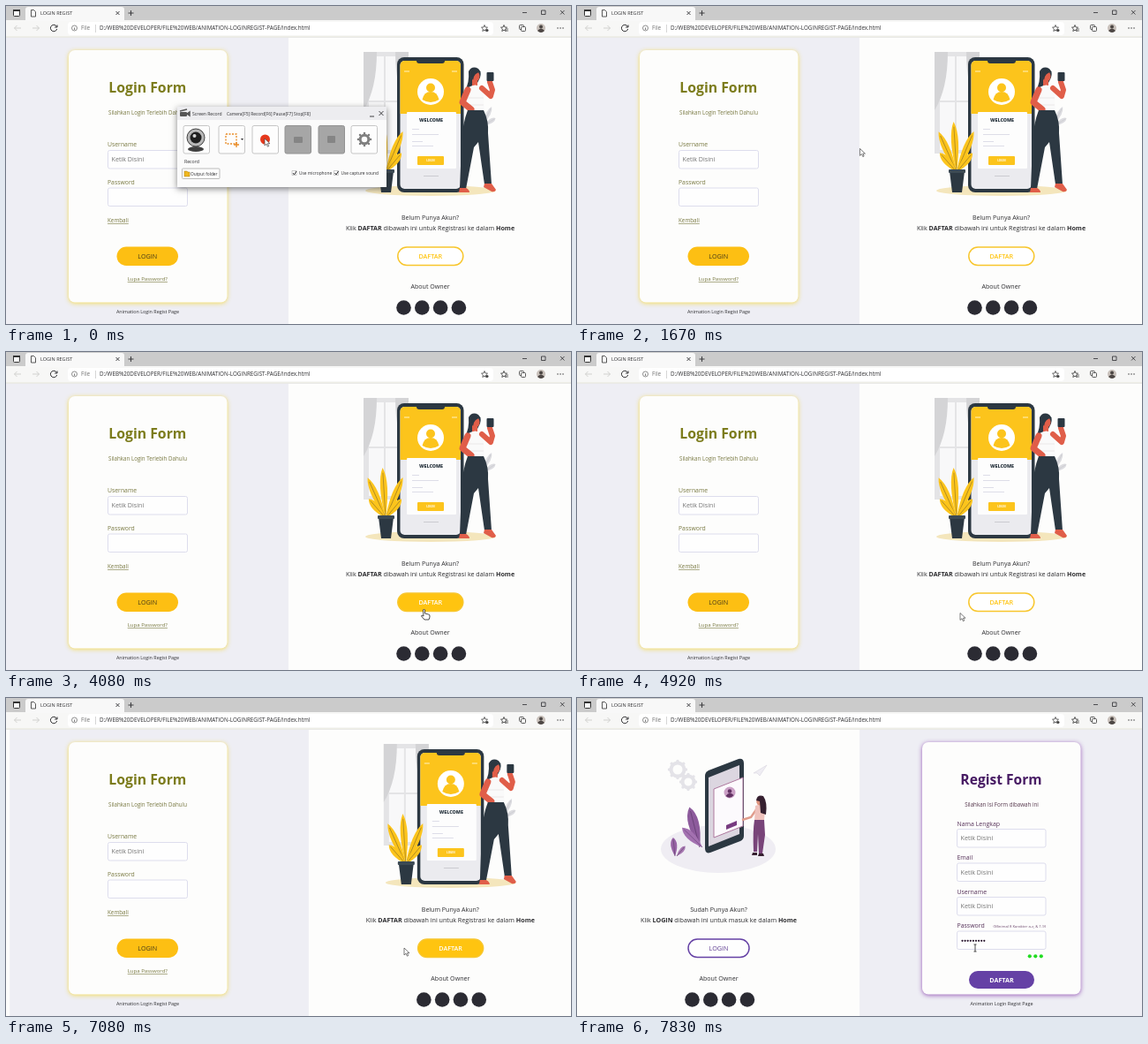
These frames come from a looping animation (640x360 px, 8000 ms). An HTML page with a canvas:

```html
<!DOCTYPE html>
<html lang="id">
<head>
<meta charset="utf-8">
<title>LOGIN REGIST</title>
<style>
html, body { margin: 0; width: 100%; height: 100%; overflow: hidden; background: #fdfdfd; }
canvas { display: block; width: 640px; height: 360px; }
</style>
</head>
<body>
<canvas id="stage" width="640" height="360"></canvas>
<script>
const ctx = document.getElementById('stage').getContext('2d');
const LOOP = 8000;
const GOLD = [255, 196, 16], WHITE = [255, 255, 255];
const PAGE = '#eeeef4', PAPER = '#fdfdfc', INK = '#2d2d30', OLIVE = '#77773f', PURPLE = '#6541a5';
const LINE = '#dddded', SLATE = '#2c3842', SKIN = '#e05e49', YELLOW = '#fcc41c';
const FONT = '"Open Sans", "Noto Sans", sans-serif';

const lerp = (a, b, k) => a + (b - a) * k;
const clamp = k => Math.max(0, Math.min(1, k));
const mix = (a, b, k) => `rgb(${a.map((v, i) => Math.round(lerp(v, b[i], k)))})`;

// CSS "ease": cubic-bezier(.25, .1, .25, 1)
function ease(x) {
  x = clamp(x);
  const bez = (s, p, q) => 3 * (1 - s) ** 2 * s * p + 3 * (1 - s) * s * s * q + s ** 3;
  let lo = 0, hi = 1;
  for (let i = 0; i < 20; i++) {
    const mid = (lo + hi) / 2;
    if (bez(mid, .25, .25) < x) lo = mid; else hi = mid;
  }
  return bez(lo, .1, 1);
}
const ramp = (t, start, length) => ease((t - start) / length);

// ---- drawing helpers
function paint(fill, stroke, width = 1) {
  if (fill) { ctx.fillStyle = fill; ctx.fill(); }
  if (stroke) { ctx.strokeStyle = stroke; ctx.lineWidth = width; ctx.stroke(); }
}
function box(x, y, w, h, r, fill, stroke, width) {
  ctx.beginPath(); ctx.roundRect(x, y, w, h, r); paint(fill, stroke, width);
}
function oval(x, y, rx, ry, fill, stroke, width) {
  ctx.beginPath(); ctx.ellipse(x, y, rx, ry, 0, 0, 7); paint(fill, stroke, width);
}
const disc = (x, y, r, fill, stroke, width) => oval(x, y, r, r, fill, stroke, width);
function shape(d, fill, stroke, width = 1) {
  const p = new Path2D(d);
  if (fill) { ctx.fillStyle = fill; ctx.fill(p); }
  if (stroke) { ctx.strokeStyle = stroke; ctx.lineWidth = width; ctx.stroke(p); }
}
function text(str, x, y, size, color, align = 'left', weight = 400) {
  ctx.font = `${weight} ${size}px ${FONT}`;
  ctx.textAlign = align;
  ctx.fillStyle = color;
  ctx.fillText(str, x, y);
  return ctx.measureText(str).width;
}
function link(str, x, y, size, align) {
  const w = text(str, x, y, size, OLIVE, align);
  ctx.fillRect(align === 'center' ? x - w / 2 : x, y + 1, w, .6);
}
function richLine(parts, center, y, size) {
  const weight = i => i % 2 ? 700 : 400;
  const widths = parts.map((s, i) => {
    ctx.font = `${weight(i)} ${size}px ${FONT}`;
    return ctx.measureText(s).width;
  });
  let x = center - widths.reduce((a, b) => a + b) / 2;
  parts.forEach((s, i) => { text(s, x, y, size, INK, 'left', weight(i)); x += widths[i]; });
}
function at(x, y, draw) {
  ctx.save(); ctx.translate(x, y); draw(); ctx.restore();
}

// ---- browser frame
function browser() {
  box(0, 0, 640, 17, 0, '#cbcbcb');
  box(0, 16, 640, 19, 0, '#f7f7f6');
  box(0, 34.5, 640, 1, 0, '#e6e6da');
  box(22, 1, 112, 16, [3, 3, 0, 0], '#f8f8f8');
  box(8.5, 4.5, 7, 7, 1, '#fff', '#333');
  box(8, 4, 8, 2, 0, '#333');
  shape('M28.5 4.5h3l2 2v5.5h-5z', '#fff', '#444', .9);
  text('LOGIN REGIST', 39, 10, 5.5, INK);
  shape('M124.500 6l4 4m0-4l-4 4M138.500 8h6m-3-3v6', null, INK, .9);
  shape('M585 7.500h5M628 5l4.500 4.500m0-4.500l-4.500 4.500', null, INK, .8);
  box(606.5, 5, 4.5, 4.5, 0, null, INK, .8);

  box(70, 18, 482, 15, 4, '#fff');
  shape('M17 25H9.5m3-3l-3 3 3 3M30 25h7.500m-3-3l3 3-3 3', null, '#ccccca', .9);
  shape('M57.500 23.500a3.700 3.700 0 1 0 .2 2.500M58 21.500v2.500h-2.800', null, INK);
  disc(77.5, 25, 3, null, '#707070', .8);
  box(77.1, 24.5, .9, 2.5, 0, '#707070');
  text('File', 85, 27.3, 6.4, '#707070');
  box(101, 21, .7, 9, 0, '#c4c4c4');
  text('D:/WEB%20DEVELOPER/FILE%20WEB/ANIMATION-LOGINREGIST-PAGE/index.html', 106, 27.3, 6.3, INK);
  const star = 'M0-3.500L1-1 3.500-.8 1.600 1 2.200 3.500 0 2.200-2.200 3.500-1.600 1-3.500-.8-1-1z';
  at(542, 25, () => { shape(star, null, '#444', .8); disc(3, 2.5, 1.5, '#444'); });
  at(564, 25, () => { shape(star, null, '#333', .8); shape('M2 1h3M2 3h3', null, '#333', .7); });
  box(581.5, 21.5, 5, 5, 1, null, '#333', .8);
  box(583.5, 23.5, 5, 5, 1, '#f7f7f6', '#333', .8);
  disc(606, 25, 5, '#c8c0ba');
  disc(606, 23.5, 2, '#4c4644');
  shape('M602 28q4-5 8 0q-4 4-8 0', '#4c4644');
  for (const x of [625, 628, 631]) disc(x, 25, .7, INK);
}

// ---- forms
function card(x, tint) {
  ctx.save();
  ctx.shadowColor = tint; ctx.shadowBlur = 5; ctx.shadowOffsetY = 1;
  box(x, 50, 179.5, 285.5, 7, PAPER);
  ctx.restore();
}
function field(x, y, w, hint) {
  box(x, y, w, 20.5, 2, '#fefefe', LINE);
  if (hint) text(hint, x + 4, y + 12.8, 7.15, '#737373');
}
function pill(x, y, w, h, label, fill, stroke, color, weight) {
  box(x, y, w, h, h / 2, fill, stroke, 1.5);
  text(label, x + w / 2, y + h / 2 + 2.6, 7.2, color, 'center', weight);
}
function loginForm() {
  card(71, 'rgba(245,215,60,.85)');
  text('Login Form', 160.3, 98, 15.8, '#7c7c1c', 'center', 700);
  text('Silahkan Login Terlebih Dahulu', 160.5, 122.5, 6.2, OLIVE, 'center');
  text('Username', 115, 159, 6.85, OLIVE);
  field(115.5, 163.5, 90, 'Ketik Disini');
  text('Password', 115, 201.5, 6.85, OLIVE);
  field(115.5, 206, 90);
  link('Kembali', 115, 245, 6.3, 'left');
  pill(125.5, 272.5, 69.5, 21.5, 'LOGIN', '#fdbf13', null, '#443a18');
  link('Lupa Password?', 160.3, 311, 6.05, 'center');
  text('Animation Login Regist Page', 160.5, 347.7, 5.4, INK, 'center');
}
function registForm() {
  card(391, 'rgba(140,70,175,.9)');
  text('Regist Form', 480.5, 98, 15.6, '#481c64', 'center', 700);
  text('Silahkan Isi Form dibawah ini', 481, 122.5, 6.2, '#55364c', 'center');
  ['Nama Lengkap', 'Email', 'Username', 'Password'].forEach((label, i) => {
    const y = 148.5 + i * 38.5;
    text(label, 430.5, y - 4, 6.95, '#553058');
    field(430.5, y, 100.5, i < 3 && 'Ketik Disini');
  });
  text('(Minimal 8 Karakter a-z, & 1-9)', 531, 260, 4.25, '#704c70', 'right');
  for (let i = 0; i < 9; i++) disc(436.5 + i * 3.1, 274.8, 1.1, '#28142c');
  for (let i = 0; i < 3; i++) disc(512.8 + i * 6.5, 292.3, 2.1, '#22dc22');
  pill(444, 309, 74, 20, 'DAFTAR', PURPLE, null, '#fff', 700);
  text('Animation Login Regist Page', 481, 347.7, 5.4, INK, 'center');
}

// ---- illustrations
function leaf(x, y, length, width, angle, color, vein) {
  ctx.save(); ctx.translate(x, y); ctx.rotate(angle);
  shape(`M0 0Q${-width}${-length * .7} 0${-length}Q${width}${-length * .7} 0 0`, color);
  shape(`M0 0V${-length * .9}`, null, vein, .6);
  ctx.restore();
}
function woman() {
  shape('M524 74q4-7 11-3q4 4 2 10l-4 8-5 12q-8 2-8-6q5-8 4-21', SLATE);
  shape('M528 83h6v8h-6z', SKIN);
  oval(532, 79.5, 4.5, 6, SKIN);
  shape('M526 79q1-8 8-8l4 4q-8 0-9 9z', SLATE);
  shape('M524 92q8-5 14 0l3 10 1 19h-19q-3-16 1-29', '#fafafa');
  shape('M523 104h18M523 112h18', null, '#e8e4e4', .8);
  ctx.lineJoin = ctx.lineCap = 'round';
  shape('M539 93l10 9 2-7-3-9', null, SKIN, 6);
  shape('M523 95l-6 14 10 8', null, SKIN, 7);
  ctx.lineJoin = 'miter'; ctx.lineCap = 'butt';
  box(544.5, 75, 8, 10, 1, SLATE);
  shape('M523 118h18q6 12 5 26l4 58h-8l-7-48-5 6-9 47h-7l2-52q1-22 7-37', SLATE);
  shape('M514 206h7q4 2 4 5h-12zM542 201h8l5 7q-1 3-5 2l-9-5z', SKIN);
}
function welcomeScene() {
  box(405, 52, 51, 115, 0, '#e4e4e6');
  box(411, 57, 39, 106, 0, '#f8f8f9');
  shape('M429 57v106M411 108h39', null, '#e4e4e6', 2);
  shape('M405 52h15q0 42-15 66zM456 52h-15q0 42 15 66z', '#d4d4d6');
  oval(481, 209, 74, 6, '#f4e6bc');
  box(443, 58, 75.5, 153, 8, SLATE);
  box(446.5, 62, 68.5, 145, 5, '#ebebef');
  box(446.5, 62, 68.5, 60, [5, 5, 0, 0], YELLOW);
  box(465, 59, 32, 6, 3, SLATE);
  shape('M451 74h6m48 0h6', null, '#fff2c0');
  disc(481, 97, 15, '#fff');
  disc(481, 92.5, 5, YELLOW);
  shape('M471.500 106q2-9 9.500-9t9.500 9q-9.500 6-19 0', YELLOW);
  box(454, 120, 56, 64, 1, '#fdfdfd');
  text('WELCOME', 481.5, 131, 5.3, SLATE, 'center', 800);
  for (const [y, w] of [[139, 8], [145, 30], [153, 12], [158, 24]])
    box(460, y, w, .8, 0, '#d6d6e4');
  box(466, 170, 30, 10, 1, YELLOW);
  text('LOGIN', 481, 176.3, 3, '#fff', 'center', 700);
  box(473, 192, 17, .8, 0, '#c4c4c8');

  const leaves = [[-.42, 50], [-.06, 57], [.4, 50], [-.72, 29], [.7, 28]];
  for (const [a, len] of leaves) leaf(430, 188, len, 8, a, YELLOW, '#8a7024');
  shape('M422 187h17l-3 24h-11z', SLATE);
  box(421, 185, 19, 4, 1, '#3c4a54');

  leaf(541, 133, 21, 5, .45, '#dcdce0', '#c8c8cc');
  leaf(542, 135, 15, 5, 1, '#dcdce0', '#c8c8cc');
  woman();
}
function registScene() {
  oval(160, 171, 65, 27, '#efedf3');
  for (const [x, y, r] of [[114, 81, 7.5], [126, 95, 6.5]]) {
    disc(x, y, r, null, '#e4e3e8', 4);
    for (let i = 0; i < 8; i++) {
      const a = i * Math.PI / 4;
      disc(x + (r + 2) * Math.cos(a), y + (r + 2) * Math.sin(a), 1.7, '#e4e3e8');
    }
  }
  shape('M200 85l15-9-8 12-3-3z', '#efedf3', '#d8d6e0', .6);
  leaf(139, 169, 47, 12, -.25, '#8d5b9c', '#593668');
  leaf(142, 169, 32, 9, -.8, '#a371b0', '#684078');
  leaf(111, 179, 21, 7, -.1, '#9864a6', '#60406c');
  leaf(113, 179, 15, 5, .7, '#a878b2', '#60406c');
  shape('M145 88q0-4 4-6l34-13q6-1 6 5v82q0 4-4 6l-34 13q-6 2-6-5z', SLATE);
  shape('M149 90l35-14v78l-35 14z', '#dcd6e0');
  shape('M155 103l33-13v55l-33 13z', '#fcfafd', '#ae789e');
  disc(173, 107, 6.5, '#cba0c6');
  disc(173, 105.5, 2.3, '#633264');
  shape('M168.500 111q4-6 9-1q-4 5-9 1', '#633264');
  for (let i = 0; i < 4; i++)
    shape(`M160${121.5 + i * 6}l${i % 2 ? 18 : 23}${i % 2 ? -7 : -9}`, null, i % 2 ? '#c394bc' : '#90618f', 1.3);
  shape('M169 144l12-5v5l-12 5z', '#783c81');
  shape('M204 125l-7 10-10 3', null, '#e09c8c', 2.5);
  shape('M202 122q7-3 11 3l-1 14h-11z', '#efc2bc');
  shape('M201 138h11l1 17-3 21h-4l-1-22-1 20h-4q-1-24 1-36', '#784479');
  oval(207, 117, 3.8, 4.5, '#dc927c');
  shape('M203 116q1-7 8-5q5 7 3 21l-6-2-1-13z', '#362030');
  shape('M199 175h5v3h-6zM206 176h5l1 3h-7z', '#362030');
}

// ---- sliding panels, 320 wide
function panel(x, scene, sceneShift, question, line, button) {
  if (x <= -320 || x >= 640) return;
  at(x, 0, () => {
    box(0, 36, 320, 324, 0, PAPER);
    at(sceneShift, 0, scene);
    text(question, 160.5, 241.6, 7.05, INK, 'center');
    richLine(line, 160.5, 253.7, 7.15);
    button();
    text('About Owner', 160.5, 319.5, 7.1, INK, 'center');
    for (let i = 0; i < 4; i++) disc(130.5 + i * 20.8, 341.5, 8.3, '#2b2b33');
  });
}

// ---- recorder window
function recorder(t) {
  const k = clamp((t - 80) / 260);
  if (k >= 1) return;
  ctx.save();
  ctx.globalAlpha = (1 - k) ** 1.5;
  ctx.translate(312, 160 + 50 * k * k); ctx.scale(1 - .25 * k, 1 - .25 * k); ctx.translate(-312, -160);
  ctx.save();
  ctx.shadowColor = 'rgba(50,50,50,.6)'; ctx.shadowBlur = 7; ctx.shadowOffsetY = 2;
  box(194, 114, 237, 91, 0, '#fbfbfb');
  ctx.restore();
  box(194, 114, 237, 15, 0, '#ededf0');
  box(197, 120, 8, 5, 1, '#555');
  shape('M197 119l8-2M205 122l3-2v4z', '#555', '#555', 1.5);
  text('Screen Record', 211, 123.8, 5.05, INK);
  text('Camera[F5] Record[F6] Pause[F7] Stop[F8]', 250, 123.8, 4.85, INK);
  shape('M412 125h5M422.500 119l5 5m0-5l-5 5', null, INK, .9);
  [201, 241, 279, 316, 354, 391].forEach((x, i) => {
    const off = i === 3 || i === 4;
    box(x, 135.5, 29.5, 31.5, 2, off ? '#a6a6a6' : '#fdfdfd', off ? '#929292' : '#c6c6c6');
  });
  oval(215, 162, 9, 3, '#404040');
  disc(215, 149, 10, '#b8b8b8', '#404040');
  disc(215, 149, 6.5, '#202020');
  disc(213.5, 147, 2, '#d6d6d6');
  ctx.setLineDash([2, 1.5]);
  box(249, 145, 12, 11, 0, null, '#e88a24', 1.3);
  ctx.setLineDash([]);
  shape('M261 154v6m-3-3h6', null, '#e88a24', 1.3);
  shape('M266 150h3l-1.500 2z', INK);
  disc(293.5, 151, 5.5, '#e6381c');
  box(326, 148, 10, 7, 1, '#858585');
  box(364, 147, 9, 8, 1, '#858585');
  disc(406, 151, 4.8, null, '#808080', 3);
  for (let i = 0; i < 8; i++)
    disc(406 + 7 * Math.cos(i * Math.PI / 4), 151 + 7 * Math.sin(i * Math.PI / 4), 1.3, '#808080');
  text('Record', 202, 177.5, 5.2, INK);
  box(199.5, 184, 42.5, 11.5, 1, '#fdfdfd', '#bcbcbc');
  shape('M202 187h3l1 1h2v5h-6z', '#f0b820', '#a87810', .5);
  text('Output folder', 209, 191.7, 4.8, INK);
  for (const [x, label] of [[324, 'Use microphone'], [371.5, 'Use capture sound']]) {
    box(x, 186.5, 5, 5, 0, '#fff', '#aaa', .6);
    shape(`M${x + 1} 189l1.500 2 2.500-4`, null, INK);
    text(label, x + 8, 191.3, 4.85, INK);
  }
  ctx.restore();
}

// ---- pointer: [time, x, y]
const TRACK = [
  [0, 293, 150], [250, 293, 150], [500, 308, 150], [1500, 308, 150],
  [2500, 468, 296.5], [2750, 468, 296.5], [3000, 473.5, 291], [4080, 473.5, 291],
  [4800, 434, 296], [5500, 434, 290], [5830, 445, 283], [6170, 451, 283], [LOOP, 451, 283]
];
// Spans during which the button is hovered, and the length of its fade.
const HOVERS = [[2850, 4320], [5675, 7080]], FADE = 500;

function pointerAt(t) {
  const i = TRACK.findIndex(p => p[0] > t);
  const a = TRACK[i - 1], b = TRACK[i], k = (t - a[0]) / (b[0] - a[0]), s = k * k * (3 - 2 * k);
  return [lerp(a[1], b[1], s), lerp(a[2], b[2], s)];
}
function pointer(t, hand) {
  at(...pointerAt(t), () => {
    if (t > 7450) shape('M-1.500-4H1.500M0-4V4M-1.500 4H1.500', null, '#222', .8);
    else if (hand) shape('M-1 1q1-2 2 0v4l4 1q2 0 1.500 3l-1 3h-5l-3.500-4q0-2 2.500 0z', '#fff', '#222', .8);
    else shape('M0 0v8l2-1.800 1.400 3 1.300-.6-1.300-2.900h2.600z', '#fff', '#444', .7);
  });
}

function draw(t) {
  const slide = ramp(t, 7014, 800);
  const hover = HOVERS.reduce((h, [on, off]) => h + ramp(t, on, FADE) - ramp(t, off, FADE), 0);
  const hand = HOVERS.some(([on, off]) => t > on && t < off - 60);
  box(0, 0, 640, 360, 0, PAGE);
  loginForm();
  registForm();
  panel(lerp(320, 640, slide), welcomeScene, -320, 'Belum Punya Akun?',
    ['Klik ', 'DAFTAR', ' dibawah ini untuk Registrasi ke dalam ', 'Home'],
    () => pill(123.8, 273, 74, 20.5, 'DAFTAR', mix(WHITE, GOLD, hover),
      '#f8c62c', mix(GOLD, WHITE, hover), 600));
  panel(lerp(-340, 0, slide), registScene, 0, 'Sudah Punya Akun?',
    ['Klik ', 'LOGIN', ' dibawah ini untuk masuk ke dalam ', 'Home'],
    () => pill(126, 273, 69, 20.5, 'LOGIN', '#fefefe', PURPLE, '#5e3c91'));
  browser();
  recorder(t);
  pointer(t, hand);
}

function tick() {
  draw(performance.now() % LOOP);
  requestAnimationFrame(tick);
}
tick();
</script>
</body>
</html>
```
